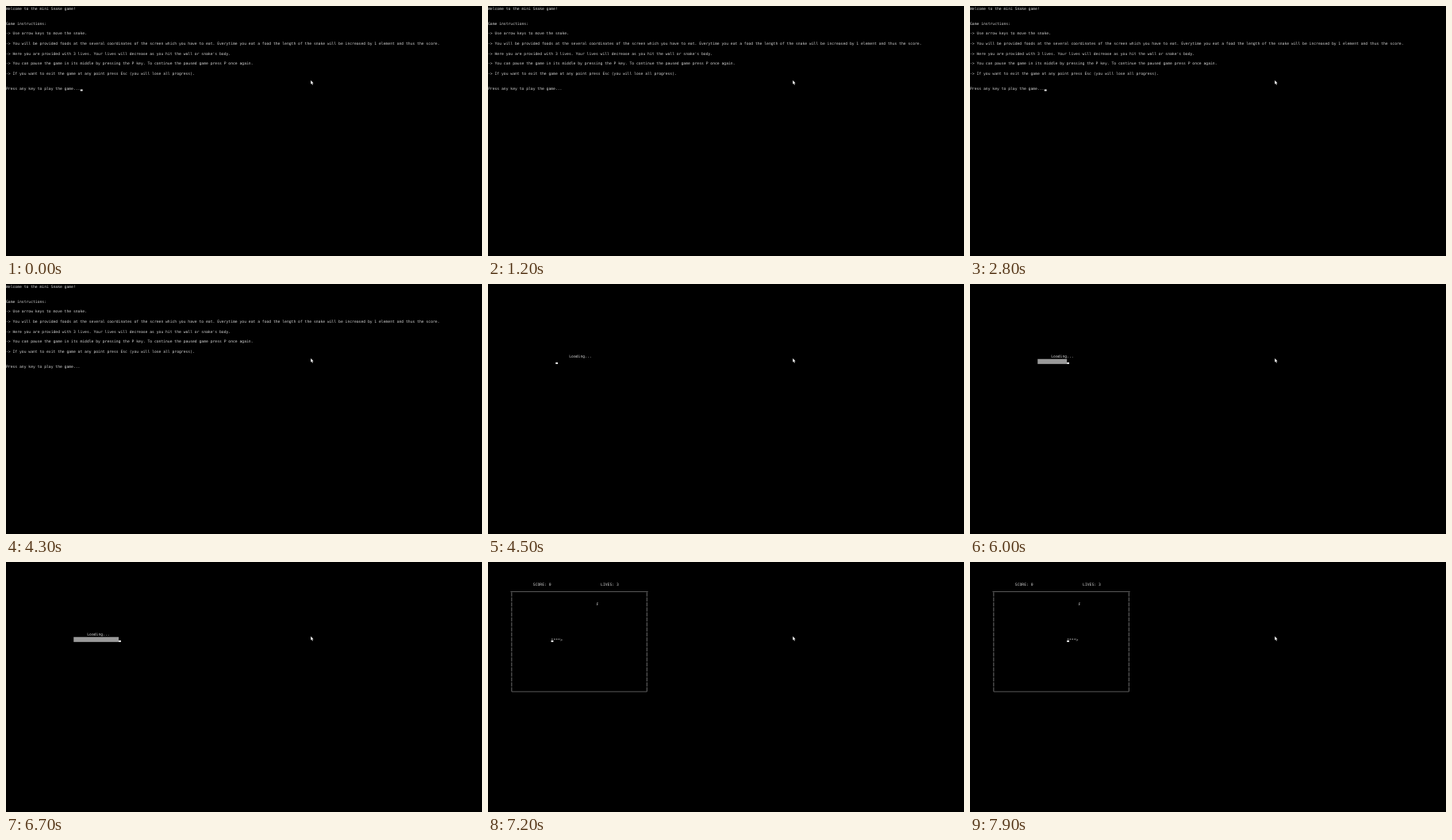
An HTML page for the animation above (8 s loop, 600x316 px).

```html
<!DOCTYPE html>
<html lang="en">
<head>
<meta charset="utf-8">
<title>Mini Snake</title>
<style>
  html, body { margin: 0; width: 100%; height: 100%; overflow: hidden; background: #000; }
  svg { display: block; width: 600px; height: 316px; }
  text {
    font: 4.72px "DejaVu Sans Mono", "Noto Sans Mono", monospace;
    fill: #d4d4d4;
    text-rendering: geometricPrecision;
    white-space: pre;
  }
  .frame { fill: none; stroke: #b4b4b4; stroke-width: .5; }
  #sides { stroke-width: .6; }
</style>
</head>
<body>
<svg viewBox="0 0 600 316">
  <g id="intro"></g>
  <g id="loading"><rect id="bar" fill="#999"/></g>
  <g id="game"><path id="border" class="frame"/><path id="sides" class="frame" stroke-dasharray="5.3 1.02"/></g>
  <g id="snake"></g>
  <rect id="cursor" fill="#fff"/>
  <path d="M384.2 94V98.7L385.3 97.8L386 99.7L386.9 99.3L386.1 97.5H387.6Z" fill="#fff"/>
</svg>
<script>
const W = 2.8415, H = 6.32, LOOP = 8000, TICK = 100;
const $ = id => document.getElementById(id);

function set(el, attrs) {
  for (const key in attrs) el.setAttribute(key, attrs[key]);
}

function print(parent, col, row, str) {
  const el = document.createElementNS("http://www.w3.org/2000/svg", "text");
  set(el, { x: col * W, y: row * H + 4.85 });
  el.textContent = str;
  parent.append(el);
}

function show(id, on) {
  $(id).style.display = on ? "" : "none";
}

function cursorAt(col, row) {
  set($("cursor"), { x: col * W, y: row * H + 4.4 });
}

const intro = [
  [0, "Welcome to the mini Snake game!"],
  [3, "Game instructions:"],
  [5, "-> Use arrow keys to move the snake."],
  [7, "-> You will be provided foods at the several coordinates of the screen which you have to eat. Everytime you eat a food the length of the snake will be increased by 1 element and thus the score."],
  [9, "-> Here you are provided with 3 lives. Your lives will decrease as you hit the wall or snake's body."],
  [11, "-> You can pause the game in its middle by pressing the P key. To continue the paused game press P once again."],
  [13, "-> If you want to exit the game at any point press Esc (you will lose all progress)."],
  [16, "Press any key to play the game..."]
];
for (const [row, str] of intro) print($("intro"), 0, row, str);

print($("loading"), 36, 14, "Loading...");
print($("game"), 20, 4, "SCORE: 0");
print($("game"), 50, 4, "LIVES: 3");
print($("game"), 48, 8, "F");
print($("snake"), 0, 15, "****>");

const left = 10.5 * W, right = 70.5 * W, top6 = 6 * H, bottom = 26 * H;
set($("border"), { d: `M${10 * W} ${top6 - .4}H${71 * W}M${left} ${bottom - .4}H${right}` });
set($("sides"), { d: `M${left} ${top6 + .4}V${bottom}M${right} ${top6 + .4}V${bottom}` });
set($("bar"), { x: 30 * W, y: 15 * H, height: H });
set($("cursor"), { width: W, height: 1.9 });

const BLINKS = [100, 600, 1200, 1700, 2200, 2800, 3300, 3800, 4300];

// Filled cells of the loading bar, with a short stall at 1 and at 10.
function filled(t) {
  if (t < 4600) return 0;
  if (t < 4800) return 1;
  return t < 5700 ? (t - 4600) / TICK : Math.max(10, (t - 4700) / TICK);
}

function draw(now) {
  const t = Math.floor((now % LOOP) / TICK) * TICK;
  const isIntro = t < 4500, isLoading = !isIntro && t < 6800, isGame = t >= 6900;
  show("intro", isIntro);
  show("loading", isLoading);
  show("game", isGame);
  show("snake", isGame);
  show("cursor", !isIntro || BLINKS.filter(b => b <= t).length % 2 === 0);

  if (isIntro) {
    cursorAt(33, 16);
  } else if (isLoading) {
    const n = filled(t);
    set($("bar"), { width: n * W });
    cursorAt(30 + n, 15);
  } else if (isGame) {
    const tail = 28 + Math.floor((t - 7200) / 46);
    set($("snake"), { transform: `translate(${tail * W})` });
    cursorAt(tail, 15);
  } else {
    cursorAt(0, 0);
  }
}

const start = performance.now();
function loop() {
  draw(performance.now() - start);
  requestAnimationFrame(loop);
}
loop();
</script>
</body>
</html>
```
